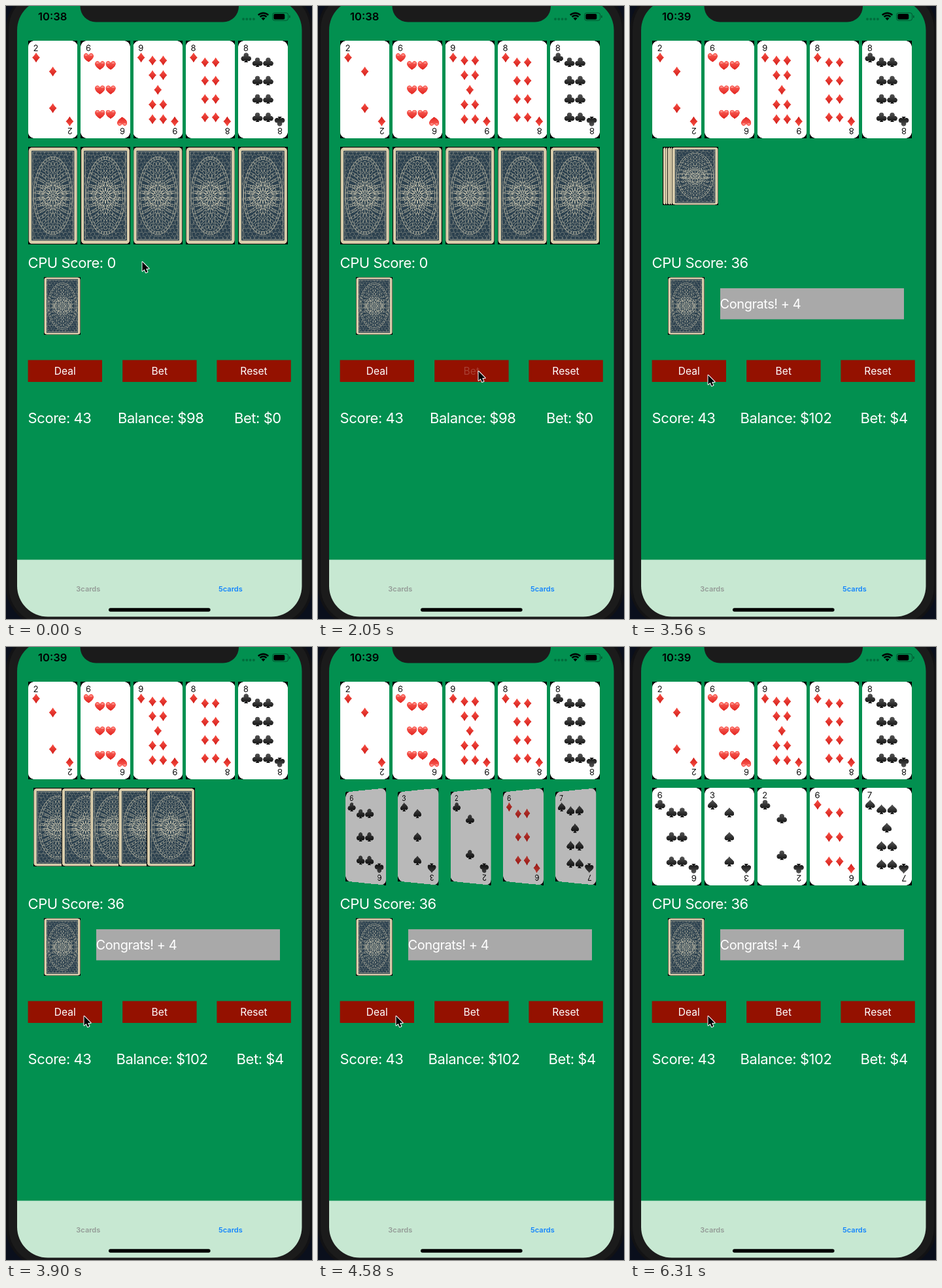
Write an HTML page with a canvas that moves like this. It is 468 px wide and 936 px high and loops after 8000 ms.

```html
<!DOCTYPE html>
<html lang="en">
<head>
<meta charset="utf-8">
<title>Five card game</title>
<style>
html, body { margin: 0; width: 100%; height: 100%; overflow: hidden; background: #0a0f1c; }
canvas { display: block; width: 468px; height: 936px; }
</style>
</head>
<body>
<canvas id="stage" width="468" height="936"></canvas>
<script>
const ctx = document.getElementById('stage').getContext('2d');
const LOOP = 8000, TAU = Math.PI * 2;
const FONT = 'Inter, "Liberation Sans", sans-serif';
const CARD_W = 75.4, CARD_H = 148.5, PITCH = 80.3, LEFT = 34;
const FELT = '#029050', BEZEL = '#1b1b1b', RED = '#941100';

// ---------- helpers ----------
function box(c, x, y, w, h, r, fill) {
  c.beginPath();
  c.roundRect(x, y, w, h, r);
  c.fillStyle = fill;
  c.fill();
}

function text(c, str, x, y, size, color = '#fff', weight = 400, align = 'left') {
  c.font = `${weight} ${size}px ${FONT}`;
  c.textAlign = align;
  c.fillStyle = color;
  c.fillText(str, x, y);
}

// Large labels use slightly tighter tracking
function label(str, x, y, size = 22) {
  ctx.letterSpacing = '-0.45px';
  text(ctx, str, x, y, size);
  ctx.letterSpacing = '0px';
}

function bitmap(w, h, paint, scale = 2) {
  const cv = document.createElement('canvas');
  cv.width = Math.round(w * scale);
  cv.height = Math.round(h * scale);
  const c = cv.getContext('2d');
  c.scale(cv.width / w, cv.height / h);
  paint(c);
  return cv;
}

const clamp = v => Math.min(1, Math.max(0, v));

// cubic-bezier(.42, 0, .58, 1)
function easeInOut(t) {
  t = clamp(t);
  let lo = 0, hi = 1;
  for (let i = 0; i < 20; i++) {
    const u = (lo + hi) / 2, v = 1 - u;
    if (1.26 * u * v * v + 1.74 * u * u * v + u * u * u < t) lo = u; else hi = u;
  }
  return lo * lo * (3 - 2 * lo);
}

// ---------- suits, centred on 0,0 ----------
function shade(c, top, bottom) {
  const g = c.createLinearGradient(0, -8, 0, 8);
  g.addColorStop(0, top);
  g.addColorStop(1, bottom);
  return g;
}

const suits = {
  diamond(c) {
    c.beginPath();
    c.moveTo(0, -7.6);
    c.quadraticCurveTo(2.6, -3, 5.9, 0);
    c.quadraticCurveTo(2.6, 3, 0, 7.6);
    c.quadraticCurveTo(-2.6, 3, -5.9, 0);
    c.quadraticCurveTo(-2.6, -3, 0, -7.6);
    c.fillStyle = shade(c, '#fb5348', '#d01c18');
    c.fill();
  },
  heart(c) {
    c.scale(.95, .95);
    c.beginPath();
    c.moveTo(0, 7.2);
    c.bezierCurveTo(-4, 4.5, -8, 1.5, -8, -2.4);
    c.bezierCurveTo(-8, -7.8, -1.8, -8.6, 0, -4);
    c.bezierCurveTo(1.8, -8.6, 8, -7.8, 8, -2.4);
    c.bezierCurveTo(8, 1.5, 4, 4.5, 0, 7.2);
    c.fillStyle = shade(c, '#ff6a60', '#e0211d');
    c.fill();
    c.fillStyle = 'rgba(255,190,185,.55)';
    for (const x of [-4, 4]) {
      c.beginPath();
      c.ellipse(x, -4.2, 2.3, 1.2, 0, 0, TAU);
      c.fill();
    }
  },
  club(c) {
    c.fillStyle = shade(c, '#5c5c5c', '#0c0c0c');
    for (const [x, y] of [[0, -3.6], [-4, 1.6], [4, 1.6]]) {
      c.beginPath();
      c.arc(x, y, 3.8, 0, TAU);
      c.fill();
    }
    stem(c);
  },
  spade(c) {
    c.fillStyle = shade(c, '#5c5c5c', '#0c0c0c');
    c.beginPath();
    c.moveTo(0, -7.8);
    c.bezierCurveTo(2, -4, 7.4, -2, 7.4, 2);
    c.bezierCurveTo(7.4, 5.6, 2, 6, 0, 2.8);
    c.bezierCurveTo(-2, 6, -7.4, 5.6, -7.4, 2);
    c.bezierCurveTo(-7.4, -2, -2, -4, 0, -7.8);
    c.fill();
    stem(c);
  }
};

function stem(c) {
  c.beginPath();
  c.moveTo(-1, 0);
  c.quadraticCurveTo(-.8, 5, -3.2, 7.2);
  c.lineTo(3.2, 7.2);
  c.quadraticCurveTo(.8, 5, 1, 0);
  c.fill();
}

// ---------- cards ----------
const pipRows = { 2: [1, 1], 3: [1, 1, 1], 6: [2, 2, 2], 7: [2, 1, 2, 2], 8: [2, 2, 2, 2], 9: [2, 2, 1, 2, 2] };

function pip(c, suit, x, y) {
  c.save();
  c.translate(x, y);
  suits[suit](c);
  c.restore();
}

function face([rank, suit]) {
  return bitmap(CARD_W, CARD_H, c => {
    box(c, 0, 0, CARD_W, CARD_H, 0, '#000');
    box(c, 0, 0, CARD_W, CARD_H, 9, '#fff');
    for (let end = 0; end < 2; end++) {
      c.save();
      if (end) {
        c.translate(CARD_W, CARD_H);
        c.rotate(Math.PI);
      }
      text(c, rank, 7.6, 15.3, 13, '#111');
      pip(c, suit, 12, 25.5);
      c.restore();
    }
    const rows = pipRows[rank];
    rows.forEach((n, i) => {
      const y = 74.8 + (i - (rows.length - 1) / 2) * 112 / rows.length;
      for (let k = 0; k < n; k++) pip(c, suit, 37.6 + (k - (n - 1) / 2) * 16.4, y);
    });
  });
}

function paintBack(c) {
  const ink = '#2c414f', line = '#a3a496', bright = '#c4c1ad';
  const cx = CARD_W / 2, cy = CARD_H / 2;
  const oval = (rx, ry, width, color = line) => {
    c.beginPath();
    c.ellipse(cx, cy, rx, ry, 0, 0, TAU);
    c.lineWidth = width;
    c.strokeStyle = color;
    c.stroke();
  };
  const leaves = (n, rx, ry, len, wide) => {
    for (let i = 0; i < n; i++) {
      const a = (i + .5) / n * TAU;
      c.beginPath();
      c.ellipse(cx + rx * Math.cos(a), cy + ry * Math.sin(a), len, wide, a, 0, TAU);
      c.stroke();
    }
  };
  box(c, 0, 0, CARD_W, CARD_H, 0, '#000');
  box(c, .7, .7, CARD_W - 1.4, CARD_H - 1.4, 5, '#d8ccab');
  box(c, 5, 5.5, CARD_W - 10, CARD_H - 11, 1, ink);
  c.save();
  c.beginPath();
  c.rect(6, 6.5, CARD_W - 12, CARD_H - 13);
  c.clip();
  c.lineWidth = .7;
  c.strokeStyle = line;
  c.strokeRect(7, 7.5, CARD_W - 14, CARD_H - 15);
  // overlapping curls fill the ground
  c.globalAlpha = .6;
  for (let row = 0; row < 23; row++) {
    for (let col = 0; col < 10; col++) {
      const x = 9 + col * 6.4 + row % 2 * 3.2;
      c.beginPath();
      c.arc(x, 9 + row * 5.9, 2.9, row + col, row + col + 4.8);
      c.stroke();
    }
  }
  c.globalAlpha = 1;
  c.beginPath();
  c.ellipse(cx, cy, 30, 60, 0, 0, TAU);
  c.fillStyle = ink;
  c.fill();
  oval(29.5, 59.5, .9);
  oval(26.5, 55, .7);
  c.lineWidth = .7;
  c.strokeStyle = line;
  leaves(44, 28, 57.2, 1.3, .9);
  leaves(30, 23.5, 49, 3.4, 2);
  leaves(26, 20, 40, 3.8, 2);
  leaves(22, 17, 31, 4, 2);
  leaves(16, 9, 24, 4, 1.8);
  c.strokeStyle = bright;
  leaves(20, 19, 19, 3, 1.8);
  leaves(16, 11, 11, 4.5, 1.6);
  leaves(10, 5, 5, 3.4, 1.2);
  oval(15.5, 15.5, .7, bright);
  c.restore();
}

const back = bitmap(CARD_W, CARD_H, paintBack);
const hand = [['2', 'diamond'], ['6', 'heart'], ['9', 'diamond'], ['8', 'diamond'], ['8', 'club']].map(face);
const rival = [['6', 'club'], ['3', 'spade'], ['2', 'club'], ['6', 'diamond'], ['7', 'spade']].map(face);
const shaded = document.createElement('canvas');
shaded.width = back.width;
shaded.height = back.height;
const shadedCtx = shaded.getContext('2d');

// Card turned about its vertical axis, nearest edge kept in the screen plane
function turnedCard(front, x, y, w, h, angle) {
  const open = angle > Math.PI / 2;
  const img = open ? front : back;
  const sin = Math.sin(angle), cos = Math.abs(Math.cos(angle));
  if (sin < .001) return ctx.drawImage(img, x, y, w, h);
  shadedCtx.drawImage(img, 0, 0);
  shadedCtx.fillStyle = `rgba(0,0,0,${.53 * sin})`;
  shadedCtx.fillRect(0, 0, shaded.width, shaded.height);
  const n = 75, half = w / 2, depth = 420;
  const scaleAt = u => depth / (depth + (open ? half - u : half + u) * sin);
  const xAt = u => x + half + u * cos * scaleAt(u);
  for (let i = 0; i < n; i++) {
    const u = -half + w * i / n, next = u + w / n;
    const s = scaleAt((u + next) / 2), left = xAt(u);
    const extra = i < n - 1 ? .6 : 0;
    ctx.drawImage(shaded, i * shaded.width / n, 0, shaded.width / n, shaded.height,
      left, y + h / 2 * (1 - s), xAt(next) - left + extra, h * s);
  }
}

function drawRival(t) {
  const dealt = t >= 3440;
  const p = dealt ? easeInOut((t - 3430) / 900) : 1;
  const angle = dealt ? Math.PI * easeInOut((t - 3940) / 900) : 0;
  const mix = (a, b) => a + (b - a) * p;
  rival.forEach((front, i) =>
    turnedCard(front, mix(51, LEFT) + i * PITCH * p, 215.3, mix(71, CARD_W), mix(86, CARD_H), angle));
}

// ---------- phone ----------
function statusBar(clock) {
  text(ctx, clock, 49, 22, 16.6, '#000', 600);
  ctx.fillStyle = 'rgba(0,0,0,.25)';
  for (let i = 0; i < 4; i++) {
    ctx.beginPath();
    ctx.arc(363 + i * 5.3, 20, 1.9, 0, TAU);
    ctx.fill();
  }
  ctx.strokeStyle = ctx.fillStyle = '#000';
  ctx.lineWidth = 2.5;
  for (const r of [7, 10.9]) {
    ctx.beginPath();
    ctx.arc(393.5, 21.6, r, -Math.PI * .75, -Math.PI * .25);
    ctx.stroke();
  }
  ctx.beginPath();
  ctx.moveTo(393.5, 22);
  ctx.arc(393.5, 21.6, 4.2, -Math.PI * .75, -Math.PI * .25);
  ctx.fill();
  ctx.beginPath();
  ctx.roundRect(407.6, 10.4, 24, 11.8, 3.4);
  ctx.lineWidth = 1;
  ctx.strokeStyle = 'rgba(0,0,0,.4)';
  ctx.stroke();
  box(ctx, 433, 14.3, 1.6, 4, 1, 'rgba(0,0,0,.4)');
  box(ctx, 409.3, 12.1, 17, 8.4, 2, '#000');
}

const frame = bitmap(468, 936, c => {
  // outside and bezel, with the screen cut out
  c.fillStyle = '#0a0f1c';
  c.fillRect(0, 0, 468, 936);
  box(c, 0, -26, 469, 974, 62, '#121214');
  box(c, 4, -22, 461, 966, 58, BEZEL);
  c.globalCompositeOperation = 'destination-out';
  box(c, 17, -10, 435.5, 942.5, 47, '#000');
  c.globalCompositeOperation = 'source-over';
  box(c, 113.5, -40, 242.5, 64.6, 24, BEZEL);
}, 1);

const taps = [[2050, 2170], [2230, 2290], [2350, 2460], [2630, 2690]];
const dealTap = [[3320, 3440]];

function labelAlpha(list, t) {
  let a = 1;
  for (const [down, up] of list) {
    if (t >= down) a = t < up ? .2 : .2 + .8 * clamp((t - up) / 120);
  }
  return a;
}

function button(name, x, alpha) {
  ctx.fillStyle = RED;
  ctx.fillRect(x, 540.6, 113.4, 33.4);
  text(ctx, name, x + 56.6, 563.2, 15.6, `rgba(255,255,255,${alpha})`, 400, 'center');
}

// ---------- pointer ----------
const path = [
  [0, 208, 390], [80, 208, 390], [320, 96, 624], [610, 280, 440], [840, 255, 293], [890, 255, 293],
  [1240, 92, 617], [1630, 245, 557], [2690, 245, 557], [2980, 167, 570], [3320, 119, 563], [LOOP, 119, 563]
];

// Monotone cubic interpolation through the path points
function pathAt(t, k) {
  let i = 0;
  while (i < path.length - 2 && t >= path[i + 1][0]) i++;
  const slope = j => {
    const a = path[j], b = path[j + 1];
    return a && b ? (b[k] - a[k]) / (b[0] - a[0]) : 0;
  };
  const tangent = j => {
    const a = slope(j - 1), b = slope(j);
    return a * b <= 0 ? 0 : 2 * a * b / (a + b);
  };
  const [p, q] = [path[i], path[i + 1]];
  const d = q[0] - p[0], u = (t - p[0]) / d, v = 1 - u;
  return p[k] * v * v * (1 + 2 * u) + q[k] * u * u * (3 - 2 * u)
    + d * u * v * (v * tangent(i) - u * tangent(i + 1));
}

function pointer(x, y) {
  ctx.save();
  ctx.translate(x, y);
  ctx.beginPath();
  for (const [px, py] of [[.5, .8], [.5, 14.8], [3.7, 11.9], [5.9, 17], [8.4, 16], [6.2, 11], [10.6, 10.9]]) ctx.lineTo(px, py);
  ctx.closePath();
  ctx.lineJoin = 'round';
  ctx.lineWidth = 2;
  ctx.strokeStyle = '#fff';
  ctx.stroke();
  ctx.fillStyle = '#000';
  ctx.fill();
  ctx.restore();
}

// ---------- scene ----------
function draw(t) {
  const dealt = t >= 3440;
  const bet = taps.filter(tap => t >= tap[1]).length;
  ctx.fillStyle = FELT;
  ctx.fillRect(0, 0, 468, 936);

  hand.forEach((img, i) => ctx.drawImage(img, LEFT + i * PITCH, 53.2, CARD_W, CARD_H));
  drawRival(t);
  label('CPU Score: ' + (dealt ? 36 : 0), 33.6, 400);
  ctx.drawImage(back, 58, 414, 56, 88);
  if (dealt) {
    ctx.fillStyle = '#a9a9a9';
    ctx.fillRect(138, 431, 281, 47.4);
    label('Congrats! + 4', 137.6, 462, 20);
  }

  button('Deal', 33.6, labelAlpha(dealTap, t));
  button('Bet', 178.2, labelAlpha(taps, t));
  button('Reset', 322.4, 1);

  label('Score: 43', 33.6, 637);
  label('Balance: $' + (dealt ? 102 : 98), dealt ? 168.6 : 171, 637);
  label('Bet: $' + bet, dealt ? 352.6 : 349, 637);

  ctx.fillStyle = '#c7e8d2';
  ctx.fillRect(0, 845.5, 468, 91);
  text(ctx, '3cards', 125.8, 893.5, 11, '#949b97', 600, 'center');
  text(ctx, '5cards', 343.4, 893.5, 11, '#1284fd', 600, 'center');
  box(ctx, 157, 919.2, 155.6, 5.6, 2.8, '#000');

  statusBar(t < 3150 ? '10:38' : '10:39');
  ctx.drawImage(frame, 0, 0);
  pointer(pathAt(t, 1), pathAt(t, 2));
}

const start = performance.now();
function tick() {
  draw((performance.now() - start) % LOOP);
  requestAnimationFrame(tick);
}
tick();
</script>
</body>
</html>
```
